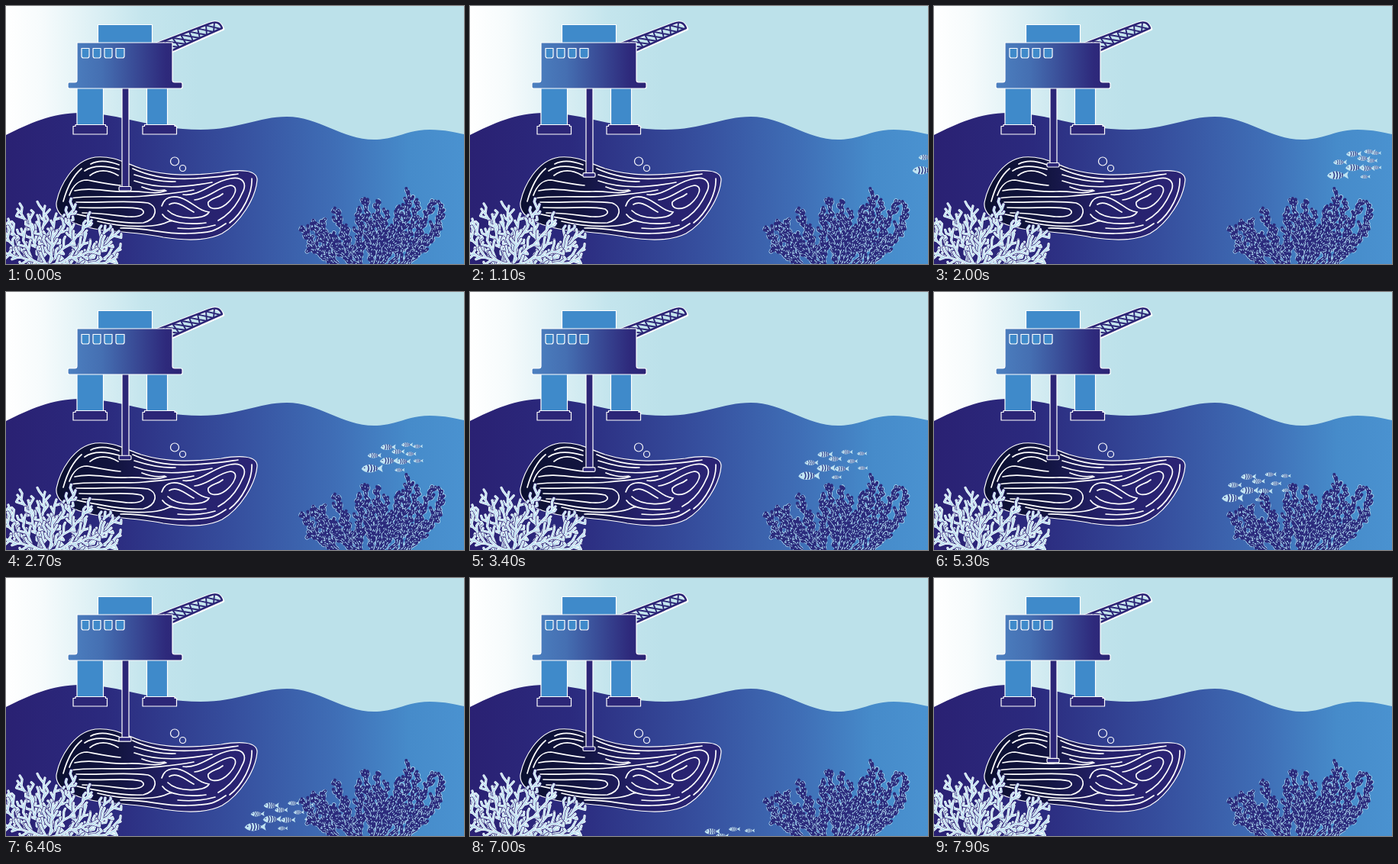
Write an HTML page that moves like this. It is 600 by 338 pixels and loops after 8 s.

```html
<!DOCTYPE html>
<html lang="en">
<head>
<meta charset="utf-8">
<title>Offshore platform</title>
<style>
html, body { margin: 0; height: 100%; overflow: hidden; }
svg { display: block; width: 100vw; height: 100vh; }
.line { stroke: #fff; stroke-width: 1.2; stroke-linejoin: round; }
.navy { fill: #2c2677; }
.blue { fill: #3f8aca; }
.coral { fill: none; stroke-linecap: round; stroke-linejoin: round; }
</style>
</head>
<body>
<svg viewBox="0 0 600 338" preserveAspectRatio="none">
  <defs>
    <linearGradient id="sky">
      <stop stop-color="#fff"/><stop offset=".08" stop-color="#f6fbfc"/>
      <stop offset=".3" stop-color="#c4e5ed"/><stop offset=".42" stop-color="#bce1ea"/>
    </linearGradient>
    <linearGradient id="sea">
      <stop stop-color="#2a2173"/><stop offset=".22" stop-color="#2b2a7e"/>
      <stop offset=".5" stop-color="#364f9e"/><stop offset=".72" stop-color="#3f6eb6"/>
      <stop offset=".88" stop-color="#468bca"/><stop offset="1" stop-color="#4a92d0"/>
    </linearGradient>
    <linearGradient id="deck">
      <stop stop-color="#4c80c0"/><stop offset=".3" stop-color="#456fb2"/>
      <stop offset=".85" stop-color="#2e2a7c"/><stop offset="1" stop-color="#2b2374"/>
    </linearGradient>
    <linearGradient id="rock">
      <stop stop-color="#0b1030"/><stop offset=".3" stop-color="#12143f"/>
      <stop offset=".6" stop-color="#25216b"/><stop offset="1" stop-color="#2b2475"/>
    </linearGradient>
    <g id="fish">
      <path fill="#bfe3f2" d="M-14 1C-10-6 1-7 8-1L14-5 12.5 0 14 5 8 1.500C2 7-9 7-14 1Z"/>
      <path fill="none" stroke="#2b3585" stroke-width="1.500" d="M-6-4.500Q-3 0-6 5M-2-5Q1 0-2 5M2-4Q4.500 0 2 4.500M5.500-2.500Q7 0 5.500 3"/>
      <circle cx="-10" cy="-.6" r=".9" fill="#2b3585"/>
    </g>
  </defs>

  <rect width="600" height="338" fill="url(#sky)"/>
  <path fill="url(#sea)" d="M0 169C30 154 60 140 97 140C150 140 190 162 255 162C305 162 330 145 368 145C410 145 440 175 482 175C512 175 525 162 555 162C575 162 590 166 600 168V338H0Z"/>

  <g fill="none" stroke="#fff" stroke-linecap="round">
    <path fill="url(#rock)" stroke-width="1.200" d="M66 258C70 236 88 202 117 198C141 196 154 205 177 213C213 224 248 222 282 218C306 214 329 214 329 228C327 252 307 284 283 298C262 309 232 307 206 303C177 297 150 296 128 294C101 290 64 280 66 258Z"/>
    <path stroke-width="1.700" d="M111 207C122 201 135 203 148 208M103 216C116 207 134 210 148 214M110 222C122 213 135 215 147 222
      M75 256C80 238 88 222 99 213M83 248C88 234 95 228 106 228C122 231 136 234 150 235M90 242C112 237 134 244 160 243S190 248 210 242
      M166 213C190 224 216 228 248 226S290 222 304 220M168 221C190 228 205 231 222 230M168 229C200 240 232 238 270 231M178 237C188 241 198 243 208 241
      M84 252C115 247 150 252 180 249S222 246 246 241M92 257C130 258 160 254 186 258C200 263 198 279 180 284C150 286 115 277 78 270
      M96 264C130 266 158 261 177 266C186 272 175 277 160 276C140 274 122 271 100 271M120 282C140 287 165 290 190 288S210 280 220 282
      M204 262C208 248 223 247 237 255S254 268 266 270C260 281 224 280 212 268M214 260C224 254 235 264 246 270M205 273C212 284 238 287 262 284
      M232 247C254 250 272 229 294 226C310 223 317 232 309 246C302 262 291 274 278 281M247 254C264 253 278 237 294 235C306 236 300 250 288 260C276 269 263 266 265 257C270 251 277 252 284 246
      M322 226C323 246 309 272 293 284M150 291C184 290 205 299 238 298S275 294 288 285M225 291C245 293 260 291 274 287"/>
    <g stroke-width="1.200"><circle cx="221" cy="203.500" r="5.500"/><circle cx="231.500" cy="212.500" r="4"/></g>
  </g>

  <g class="line navy">
    <path id="rod"/>
    <rect id="bit" x="148" width="16" height="5.500" rx="1.500"/>
  </g>

  <path d="M196 50L267 23Q279 18 284 30L218 59Z" fill="#c4e5ed" stroke="#fff" stroke-width="4.500" stroke-linejoin="round"/>
  <g fill="none" stroke="#2c2677" stroke-linejoin="round">
    <path stroke-width="2.500" d="M196 50L267 23Q279 18 283 29L218 58Z"/>
    <path id="truss" stroke-width="1.900"/>
  </g>
  <g class="line">
    <path class="blue" d="M120.500 24.500H191.500V49H120.500ZM93 107H127.500V157H93ZM184.500 107H211.500V157H184.500Z"/>
    <path class="navy" d="M91 155.500H130.500V157.500H132.500V168H88V157.500H91ZM181.500 155.500H221V157.500H223.500V168H179V157.500H181.500Z"/>
    <path fill="url(#deck)" d="M93 48H218V97Q218 100 221 100H229Q231 100 231 102V106Q231 108 229 108H83Q81 108 81 106V102Q81 100 83 100H90Q93 100 93 97Z"/>
    <path class="blue" d="M99 55.500h10v10q0 2.500-2.500 2.500h-5q-2.500 0-2.500-2.500zm15 0h10v10q0 2.500-2.500 2.500h-5q-2.500 0-2.500-2.500zm15 0h10v10q0 2.500-2.500 2.500h-5q-2.500 0-2.500-2.500zm15 0h11v10q0 2.500-2.500 2.500h-6q-2.500 0-2.500-2.500z"/>
  </g>

  <g id="school"></g>
  <g id="bubbles" fill="#8fc4e8"></g>
  <g id="corals" class="coral"></g>
</svg>
<script>
const $ = id => document.getElementById(id);
const add = (parent, tag, attrs) => {
  const el = document.createElementNS("http://www.w3.org/2000/svg", tag);
  for (const k in attrs) el.setAttribute(k, attrs[k]);
  return parent.appendChild(el);
};
let seed = 11;
const rnd = (a, b) => {
  seed = (seed * 16807) % 2147483647;
  return a + (b - a) * seed / 2147483647;
};
const smooth = u => (u = Math.min(1, Math.max(0, u)), u * u * (3 - 2 * u));

// Crane lattice
let truss = "";
for (let i = 0; i < 7; i++) {
  const top = k => `${196 + k * 11} ${50 - k * 4.1}`;
  const low = k => `${218 + k * 9} ${58 - k * 4}`;
  truss += `M${top(i)}L${low(i + 1)}M${low(i)}L${top(i + 1)}`;
}
$("truss").setAttribute("d", truss);

// A curved stem from base to tip, with forked twigs along it
function stem(x0, y0, x1, y1, step, size) {
  const cx = x0 + (x1 - x0) * rnd(.4, .9), cy = y0 + (y1 - y0) * rnd(.3, .6);
  const at = (u, a, b, c) => (1 - u) ** 2 * a + 2 * u * (1 - u) * b + u * u * c;
  const n = Math.ceil(Math.hypot(x1 - x0, y1 - y0) / step);
  const dir = Math.atan2(y1 - y0, x1 - x0);
  let d = `M${x0} ${y0}`, twigs = "";
  for (let i = 1; i <= n; i++) {
    const u = i / n, j = i < n ? 1.5 : 0;
    const x = at(u, x0, cx, x1) + rnd(-j, j), y = at(u, y0, cy, y1) + rnd(-j, j);
    d += `L${x.toFixed(1)} ${y.toFixed(1)}`;
    if (i == n || u < .15) continue;
    const a = dir + (i % 2 ? 1 : -1) * rnd(.4, 1), r = size * rnd(.5, 1.1);
    const px = x + r * Math.cos(a), py = y + r * Math.sin(a);
    twigs += `M${x} ${y}L${px} ${py}l${rnd(-3, 3)} ${rnd(-5, -2)}`;
  }
  return d + twigs;
}

const paleTips = [[3,279],[15,266],[29,273],[0,298],[51,262],[40,283],[66,272],[91,260],[82,280],
  [112,281],[105,298],[130,288],[148,295],[150,319],[138,309],[20,292],[143,333],[0,324],[62,295],[120,318]];
const darkTips = [[389,291],[400,285],[413,282],[430,267],[444,289],[470,252],[486,255],[462,266],
  [527,243],[540,258],[515,262],[558,255],[571,261],[567,288],[550,300],[545,316],[500,269],
  [396,314],[425,300],[480,287],[521,286]];

const corals = $("corals");
const layer = (d, stroke, width, dash = "none") =>
  add(corals, "path", { d, stroke, "stroke-width": width, "stroke-dasharray": dash });

for (const [x, y] of paleTips) {
  const d = stem(rnd(35, 105), 342, x, y, 8, 11);
  layer(d, "#2b2a7c", 4.6);
  layer(d, "#fff", 3.2);
  layer(d, "#bfe0f1", 1.7);
}
for (const [x, y] of darkTips) {
  const d = stem(480 + (x - 480) * .45 + rnd(-12, 12), 342, x, y, 5, 7);
  layer(d, "#b4e0f4", 5.6, "1.5 5");
  layer(d, "#2b2a7c", 4);
  layer(d, "#a9daf2", 1.1, "1 6.5");
}

// x, y and length of each fish, relative to the leader
const fish = [[0,0,28],[22,-10,24],[3,-17,18],[21,-28,20],[34,-22,17],[50,-31,15],
  [70,-29,13],[43,-9,19],[57,-19,14],[71,-10,13],[36,2,13]]
  .map(([x, y, w]) => ({ x, y, w, el: add($("school"), "use", { href: "#fish" }) }));
const bubbles = [[411,225,3.5],[414,241,2.2],[466,212,2.5]]
  .map(([cx, cy, r]) => add($("bubbles"), "circle", { cx, cy, r }));

// Offset from the resting place along a quadratic curve
const bend = (u, c, e) => 2 * u * (1 - u) * c + u * u * e;

function draw(now) {
  const t = Math.floor(now % 8000 / 100) * 100;

  const half = t % 4000 / 2000;
  const y = 239 - 31 * smooth(half < 1 ? half : 2 - half);
  $("rod").setAttribute("d", `M152 106H161V${y - 2}H152Z`);
  $("bit").setAttribute("y", y - 2.5);

  let fx = 433, fy = 244;
  if (t < 4000) {
    const u = 1 - smooth(t / 4000);
    fx += bend(u, 92, 200);
    fy += bend(u, -30, -30);
  } else {
    const u = smooth((t - 4000) / 4000);
    fx += bend(u, -86, -160);
    fy += bend(u, 45, 146);
  }
  const tight = .6 * (1 - smooth((t - 1800) / 1800));
  for (const f of fish) {
    const x = fx + f.x - tight * Math.max(0, f.x - 36);
    f.el.setAttribute("transform", `translate(${x} ${fy + f.y}) scale(${f.w / 28})`);
  }

  $("bubbles").setAttribute("opacity", smooth((t - 3600) / 400) * (1 - smooth((t - 4500) / 500)));
  $("bubbles").setAttribute("transform", `translate(0 ${(4200 - t) * .012})`);
}

const start = performance.now();
(function loop() {
  draw(performance.now() - start);
  requestAnimationFrame(loop);
})();
</script>
</body>
</html>
```
